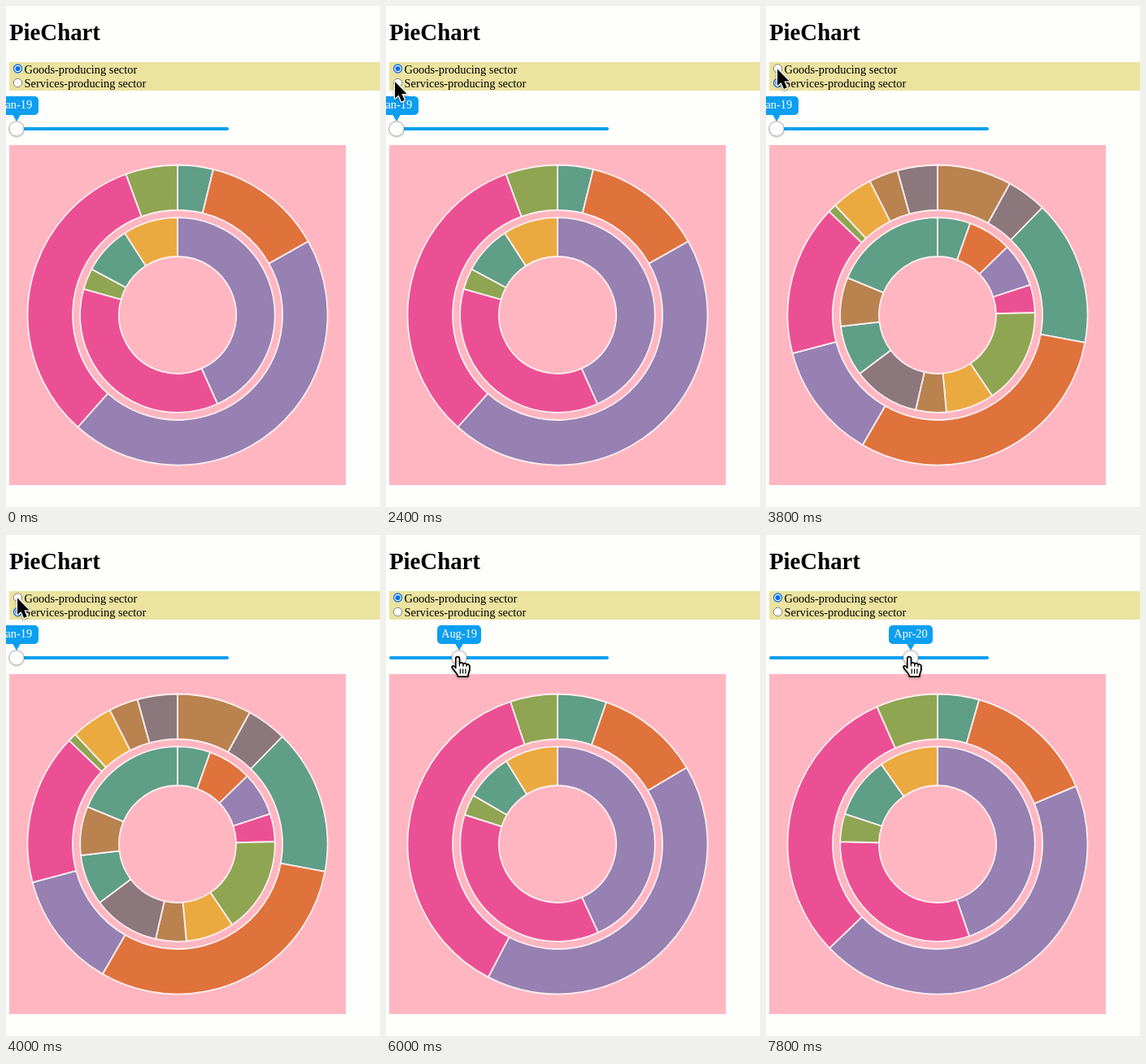
Animation of 460 by 616 pixels, one loop 8 s. Source, as an HTML page with a canvas:

```html
<!DOCTYPE html>
<html lang="en">
<head>
<meta charset="utf-8">
<title>PieChart</title>
<style>
html, body { margin: 0; width: 100%; height: 100%; overflow: hidden; background: #fefefc; }
canvas { display: block; }
</style>
</head>
<body>
<canvas id="stage" width="460" height="616"></canvas>
<script>
const ctx = document.getElementById('stage').getContext('2d');
const LOOP = 8000, STEP = 200, BLUE = '#0c9ff0';
const SERVICES_ON = 2600, SERVICES_OFF = 4400, DRAG_START = 5400;
const SERIF = '"Liberation Serif", "Times New Roman", serif';
const MONTHS = 'Jan Feb Mar Apr May Jun Jul Aug Sep Oct Nov Dec'.split(' ');
const COLORS = {
  teal: '#5f9e87', orange: '#e0723c', purple: '#9780b2', pink: '#ec5094',
  green: '#8fa552', yellow: '#ebaa40', brown: '#b9824f', mauve: '#8c777d'
};

// Ring boundaries: the end angle of each slice, in degrees clockwise from the top.
const goodsColors = {
  outer: ['teal', 'orange', 'purple', 'pink', 'green'],
  inner: ['purple', 'pink', 'green', 'teal', 'yellow']
};
const goodsByMonth = [
  { month: 0, outer: [13.8, 60.6, 221.7, 339.9, 360], inner: [155.8, 285.5, 298.1, 327.2, 360] },
  { month: 7, outer: [19, 59.4, 207.5, 341.7, 360], inner: [155.4, 287.5, 300, 328.3, 360] },
  { month: 15, outer: [16.1, 67.3, 226.1, 336.2, 360], inner: [161, 271.4, 288, 324.8, 360] }
];
const servicesColors = {
  outer: ['brown', 'mauve', 'teal', 'orange', 'purple', 'pink', 'green', 'yellow', 'brown', 'mauve'],
  inner: ['teal', 'orange', 'purple', 'pink', 'green', 'yellow', 'brown', 'mauve', 'teal', 'brown', 'teal']
};
const services = {
  outer: [28.8, 44.3, 100.6, 210, 255.2, 313.7, 317, 333.2, 344.5, 360],
  inner: [19.6, 45.7, 72, 88.6, 145.9, 174.8, 193, 233.1, 263.3, 292.5, 360]
};

// Pointer path: time, x, y
const pointerPath = [
  [1000, 60, 560], [1400, 16, 93], [2400, 11, 93], [3000, 11, 93], [3800, 14, 77.5],
  [4400, 14, 77.5], [5000, 82, 134], [5400, 11, 149.5], [6000, 88, 149.5], [7800, 176, 149.5]
];
const arrow = new Path2D('M0 0V20.5L4.6 16.4L8 24.5L11.8 22.8L8.4 15H14.6Z');
const hand = new Path2D('M-2.2 14V2.6a2.3 2.3 0 0 1 4.6 0V9c.5-2 4-2 4.5.5c.5-2 4-1.5 4.2.8' +
  'c1-1.5 3.6-.8 3.6 1.7V16c0 3-2 4-2 8.5H.5c0-3-4-6-6.8-10.5c-1.5-2.5 1.5-4 4.1 0Z');
const handLines = new Path2D('M3.3 15v6M6.6 15v6M9.9 15v6M2.4 9v3M6.9 9.5v3M11.1 10.3v2.5');

const lerp = (a, b, p) => a + (b - a) * p;
const clamp = p => Math.min(1, Math.max(0, p));

// The two keys around a position and the progress between them.
function segment(keys, position, at) {
  const next = keys.findIndex(k => at(k) >= position);
  const i = next < 0 ? keys.length - 1 : Math.max(1, next);
  const a = keys[i - 1], b = keys[i];
  return { a, b, p: clamp((position - at(a)) / (at(b) - at(a))) };
}

function text(str, x, y, font, color = '#000', align = 'left') {
  ctx.font = font + ' ' + SERIF;
  ctx.fillStyle = color;
  ctx.textAlign = align;
  ctx.fillText(str, x, y);
}

function disc(x, y, r, fill, stroke, width = 1) {
  ctx.beginPath();
  ctx.arc(x, y, r, 0, Math.PI * 2);
  ctx.fillStyle = fill;
  ctx.fill();
  if (!stroke) return;
  ctx.strokeStyle = stroke;
  ctx.lineWidth = width;
  ctx.stroke();
}

function bar(x, y, w, h, r, fill) {
  ctx.beginPath();
  ctx.roundRect(x, y, w, h, r);
  ctx.fillStyle = fill;
  ctx.fill();
}

function ring(ends, colors, r0, r1) {
  let start = 0;
  ends.forEach((end, i) => {
    const [a, b] = [start, end].map(d => (d - 90) * Math.PI / 180);
    ctx.beginPath();
    ctx.arc(211, 380, r1, a, b);
    ctx.arc(211, 380, r0, b, a, true);
    ctx.closePath();
    ctx.fillStyle = COLORS[colors[i]];
    ctx.fill();
    ctx.strokeStyle = '#fff0f2';
    ctx.lineWidth = 1.8;
    ctx.stroke();
    start = end;
  });
}

function radio(y, label, checked) {
  if (checked) {
    disc(14.5, y, 5, '#fff', '#0a6fe8', 1.3);
    disc(14.5, y, 3.1, '#0a6fe8');
  } else {
    disc(14.5, y, 5.2, '#fff', '#777', 0.9);
  }
  text(label, 22.5, Math.floor(y) + 6, '14.4px');
}

function slider(month) {
  const x = 13 + month * 11;
  bar(4, 149, 270, 4, 2, BLUE);
  bar(x - 27, 111, 54, 23, 5, BLUE);
  ctx.beginPath();
  ctx.moveTo(x - 5, 133.5);
  ctx.lineTo(x + 5, 133.5);
  ctx.lineTo(x, 142);
  ctx.fill();
  text(`${MONTHS[month % 12]}-${19 + Math.floor(month / 12)}`, x, 126, '14.4px', '#fff', 'center');
  ctx.save();
  ctx.shadowColor = 'rgba(0,0,0,.45)';
  ctx.shadowBlur = 3;
  ctx.shadowOffsetY = 0.5;
  disc(x, 151, 9, '#fff');
  ctx.restore();
  disc(x, 151, 9, '#fff', '#aaa', 0.8);
}

function pie(isServices, month) {
  ctx.fillStyle = '#ffb6c1';
  ctx.fillRect(4, 171, 414, 418);
  let rings = services, colors = servicesColors;
  if (!isServices) {
    const { a, b, p } = segment(goodsByMonth, month, k => k.month);
    const mix = name => a[name].map((v, i) => lerp(v, b[name][i], p));
    rings = { outer: mix('outer'), inner: mix('inner') };
    colors = goodsColors;
  }
  ring(rings.outer, colors.outer, 129, 184.5);
  ring(rings.inner, colors.inner, 72, 119.8);
}

function pointer(x, y, isHand) {
  const shape = isHand ? hand : arrow;
  ctx.save();
  ctx.translate(x, y);
  ctx.lineJoin = 'round';
  ctx.shadowColor = 'rgba(0,0,0,.35)';
  ctx.shadowBlur = 3;
  ctx.shadowOffsetY = 1.5;
  ctx.lineWidth = isHand ? 1.6 : 2.6;
  ctx.strokeStyle = isHand ? '#000' : '#fff';
  ctx.fillStyle = isHand ? '#fff' : '#000';
  ctx.stroke(shape);
  ctx.shadowColor = 'transparent';
  ctx.fill(shape);
  if (isHand) {
    ctx.stroke(shape);
    ctx.lineWidth = 1.2;
    ctx.stroke(handLines);
  }
  ctx.restore();
}

function draw(now) {
  const t = Math.floor(now % LOOP / STEP) * STEP;
  const { a, b, p } = segment(pointerPath, t, k => k[0]);
  const x = lerp(a[1], b[1], p), y = lerp(a[2], b[2], p);
  const isServices = t >= SERVICES_ON && t < SERVICES_OFF;
  const isDragging = t >= DRAG_START;
  const month = isDragging ? Math.round((x - 11) / 11) : 0;

  ctx.fillStyle = '#fefefc';
  ctx.fillRect(0, 0, 460, 616);
  text('PieChart', 4, 42, 'bold 28.8px');
  ctx.fillStyle = '#ebe39f';
  ctx.fillRect(4, 69, 456, 35);
  radio(77, 'Goods-producing sector', !isServices);
  radio(94.5, 'Services-producing sector', isServices);
  pie(isServices, month);
  slider(month);
  if (t >= pointerPath[0][0]) pointer(x, y, isDragging);
}

const startTime = performance.now();
function tick() {
  draw(performance.now() - startTime);
  requestAnimationFrame(tick);
}
tick();
</script>
</body>
</html>
```
